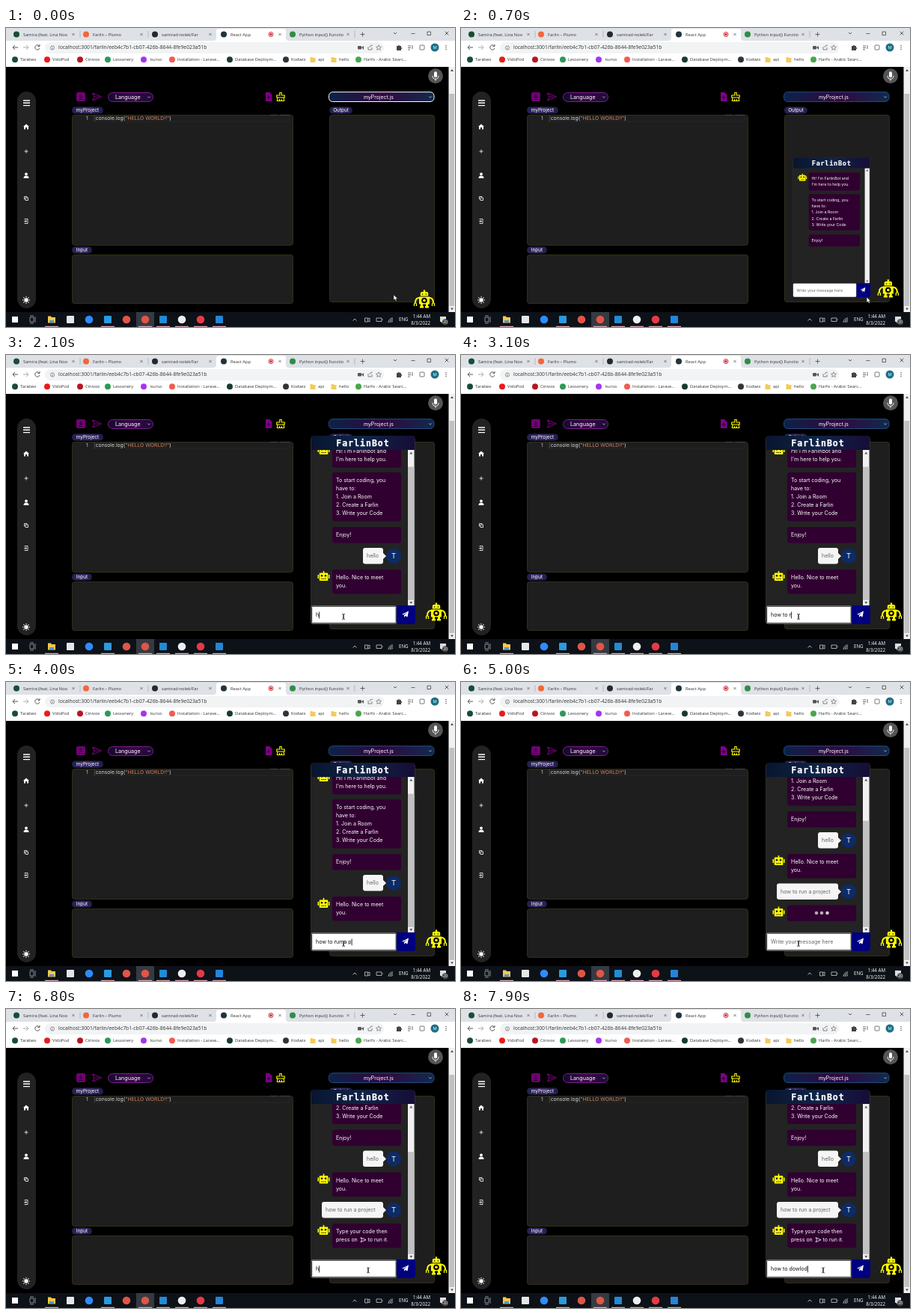
Animation of 600 by 400 pixels, one loop 8000 ms. Source, as an HTML page:

```html
<!DOCTYPE html>
<html lang="en">
<head>
<meta charset="utf-8">
<title>Code room with chat bot</title>
<style>
html, body { margin: 0; width: 100%; height: 100%; overflow: hidden; background: #000; }
svg { display: block; }
text { font: 7.05px Inter, sans-serif; fill: #fff; white-space: pre; }
.ui, .ui text { font: 5.75px "Open Sans", sans-serif; fill: #333; }
.tray text { font: 6.2px "Open Sans", sans-serif; }
.line { fill: none; stroke-width: 1; }
</style>
</head>
<body>
<svg id="stage" width="600" height="400" viewBox="0 0 600 400"></svg>
<script>
const stage = document.getElementById('stage');
const rect = (x, y, w, h, fill, r = 0, more = '') =>
  `<rect x="${x}" y="${y}" width="${w}" height="${h}" fill="${fill}" rx="${r}" ${more}/>`;
const dot = (x, y, r, fill, more = '') => `<circle cx="${x}" cy="${y}" r="${r}" fill="${fill}" ${more}/>`;
const text = (x, y, s, more = '') => `<text x="${x}" y="${y}" ${more}>${s}</text>`;
const path = (d, fill, more = '') => `<path d="${d}" fill="${fill}" ${more}/>`;
const line = (d, color, w = 1) => `<path class="line" d="${d}" stroke="${color}" style="stroke-width:${w}"/>`;
const at = (x, y, body, id = '') => `<g id="${id}" transform="translate(${x} ${y})">${body}</g>`;
const cross = (x, y, r, c = '#555') => line(`M${x - r} ${y - r}l${2 * r} ${2 * r}m0 ${-2 * r}l${-2 * r} ${2 * r}`, c, .7);
const chevron = (x, y, c, r = 2) => line(`M${x - r} ${y - r / 2}l${r} ${r} ${r} ${-r}`, c, .8);
const gradient = (id, ...colors) => `<linearGradient id="${id}">${colors.map((c, i) =>
  `<stop offset="${i / (colors.length - 1)}" stop-color="${c}"/>`).join('')}</linearGradient>`;

const defs = `<defs>
  ${gradient('tagFill', '#20204f', '#3a2c66', '#1d1d4a')}
  ${gradient('langFill', '#14082e', '#3a0849', '#1b0b36')}
  ${gradient('selectFill', '#0b2348', '#310841', '#102a4e')}
  ${gradient('headFill', '#08152f', '#102448', '#160d37')}
  <clipPath id="body"><path d="M408 127h130v208H408z"/></clipPath></defs>`;

function browser() {
  const tabs = [
    [14, 'Samira (feat. Lina Noo', '#174d35', 90], [107, 'Farlin – Plumo', '#f2663b', 181],
    [199, 'samirad-nolek/Far', '#24292f', 273], [291, 'React App', '#20343c', 366],
    [383, 'Python input() Functio', '#2f8d46', 457]];
  const marks = [
    [12, 19, 'Tarabeo', '#174d35'], [55, 62, 'VidoPod', '#e81c1c'], [99, 106, 'Cinivox', '#b71620'],
    [136, 143, 'Lessonery', '#2d9a57'], [184, 193, 'kurso', '#a435f0'],
    [222, 229, 'Installation - Larave...', '#f35b50'], [299, 306, 'Database Deploym...', '#173b30'],
    [374, 381, 'Kodwix', '#30343a'], [410, 417, 'api', '#f4ca58'], [438, 445, 'hello', '#f4ca58'],
    [471, 478, 'Harfo - Arabic Searc...', '#49a64c']];
  return '<g class="ui">' + rect(0, 0, 600, 52, '#fff') + rect(0, 0, 600, 17, '#dee1e6')
    + path('M277 17q4 0 4-4V4q0-3 3-3h87q3 0 3 3v9q0 4 4 4z', '#fff')
    + tabs.map(([x, s, c, end]) => dot(x, 8.5, 4, c) + text(x + 9, 10.5, s) + cross(end, 8.5, 1.6)).join('')
    + line('M99 4v9M190 4v9M466 4v9', '#9a9da1', .6)
    + dot(354, 8.5, 3, 'none', 'stroke="#d42b35"') + dot(354, 8.5, 1.7, '#d42b35')
    + line('M473.500 8.500h6m-3-3v6', '#444', .8)
    + chevron(520, 7, '#333') + line('M541.500 7.500h5M563 5h4.500v4.500h-4.500z', '#333', .7) + cross(589, 7, 2.3, '#222')
    + line('M16 26h-7m3-3-3 3 3 3', '#555') + line('M23 26h7m-3-3 3 3-3 3', '#aaa')
    + line('M44.500 24a3.200 3.200 0 1 0 .5 3M45 22v2.500h-2.500', '#555')
    + rect(52, 19, 453, 15, '#f1f3f4', 7.5) + dot(62, 26.5, 2.6, 'none', 'stroke="#666" stroke-width=".7"')
    + line('M62 26v2m0-3.200v-.7', '#666', .7)
    + text(70, 28.3, 'localhost:3001/farlin/eeb4c7b1-cb07-426b-8644-8fe9e023a51b', 'style="font-size:6.8px"')
    + rect(470, 24, 5, 4.5, '#555', 1) + path('M475 26l3-2v5z', '#555')
    + line('M484 25v4h5v-3m-3 0q0-3 4-3', '#555', .7)
    + path('M498 22.800l1 2.300 2.500.2-1.900 1.600.6 2.400-2.200-1.300-2.200 1.300.6-2.400-1.900-1.600 2.500-.2z', 'none', 'stroke="#555" stroke-width=".6"')
    + path('M522 24h2q1-3 2 0h2v2q3 1 0 2v2h-6z', '#444')
    + line('M537 24h4m-4 2.500h4m-4 2.500h3M543 23v5', '#444', .8) + rect(553, 23, 6, 6, '#fff', 1, 'stroke="#555" stroke-width=".8"')
    + dot(573, 26, 5.5, '#1c7088') + text(573, 28, 'M', 'text-anchor="middle" style="fill:#fff"')
    + [23.5, 26, 28.5].map(y => dot(588, y, .7, '#444')).join('')
    + marks.map(([x, tx, s, c]) => (c == '#f4ca58' ? path(`M${x - 3.5} 39h3l1 1h3v6h-7z`, c) : dot(x, 42.3, 4, c)) + text(tx, 44.2, s)).join('')
    + '</g>';
}

function page() {
  const panel = (x, y, w, h) => rect(x, y, w, h, '#1e1e1e', 3, 'stroke="#38381c" stroke-width=".8"');
  const tag = (x, y, w, s) => rect(x, y, w, 9, 'url(#tagFill)', 4.5)
    + text(x + w / 2, y + 6.8, s, 'text-anchor="middle" style="font-size:6.4px"');
  const rays = [...Array(8)].map((_, i) => `<path class="line" d="M0-5v1.500" stroke="#fff" transform="rotate(${i * 45})"/>`).join('');
  return rect(591.5, 52, 8.5, 328, '#f1f1f1') + rect(592.5, 88, 6.5, 284, '#c1c1c1')
    + path('M596 55l2 3h-4zM596 377.500l2-3h-4z', '#555')
    + dot(574, 64.3, 10, '#555') + rect(572, 58.3, 4, 8, '#fff', 2) + line('M570 63.800q0 4.500 4 4.500t4-4.500m-4 4.500v2.500', '#fff', .9)
    + rect(15, 85, 25, 290, '#222', 12.5)
    + line('M23 97h9m-9 3.300h9m-9 3.300h9', '#fff', 1.4)
    + path('M27 128.500l4 3.500h-1v3.500h-2v-2.500h-2v2.500h-2V132h-1z', '#fff')
    + line('M24.500 165h5m-2.500-2.500v5', '#fff', .8)
    + dot(27, 195.3, 1.9, '#fff') + path('M23.500 201q0-3.500 3.500-3.500t3.500 3.500z', '#fff')
    + line('M26 227h3.500v3.500h-3.500zM25.500 229h-1v-3.500h3.500v1', '#fff', .8)
    + line('M25 256.500v-1h4v6h-4v-1M24 258.500h3.500m-1.500-1.500 1.500 1.500-1.500 1.500', '#fff', .8)
    + at(27, 364, dot(0, 0, 2.7, '#fff') + rays)
    + rect(94, 86, 12, 12, '#730075', 2) + line('M100 88.500v5m-2.200-2 2.200 2 2.200-2m-5 4h5.500', '#20002a')
    + path('M115.500 87l12 5-12 5 2.500-5z', 'none', 'stroke="#730075" stroke-width="1.2" stroke-linejoin="round"') + line('M118 92h6', '#730075')
    + rect(136.500, 86.500, 60, 12, 'url(#langFill)', 6, 'stroke="#87219a" stroke-width=".9"')
    + text(146, 95, 'Language', 'style="font-size:7.2px"') + chevron(191, 92.500, '#ccc', 1.700)
    + path('M347 86h5l3.500 3.500V98h-8.500z', '#81008a') + line('M351 90.500v5m-2.500-2.500h5', '#16001c')
    + line('M365.800 90v-3.500h2.400V90h4v3h-10.400v-3zM363 93l-.7 4.500h9.400l-.7-4.500M365.500 95v2m2.800-2v2', '#ff0', 1.1)
    + rect(431.500, 85.700, 140.500, 12.800, 'url(#selectFill)', 5, 'id="select" stroke-width="1"')
    + text(498, 94.500, 'myProject.js', 'text-anchor="middle" style="font-size:6.9px"') + chevron(567, 92.300, '#ccc', 1.700)
    + tag(88, 105.500, 42, 'myProject') + panel(88.500, 116.500, 295, 174)
    + rect(116.500, 117, 262, 8, 'none', 0, 'stroke="#292929" stroke-width=".7"') + line('M118.500 117v8', '#555', .7)
    + line('M353 116.300h10m3 0h13', '#4a4a68', .7)
    + text(107, 123.200, '1', 'style="font-size:6.7px;fill:#ccc"')
    + text(119.700, 123.200, 'console.log(<tspan fill="#ce8060" style="fill:#ce8060">"HELLO WORLD!!"</tspan>)', 'style="font-size:6.8px;fill:#ddd"')
    + tag(88, 292.500, 27, 'Input') + panel(88.500, 303.500, 295, 65)
    + tag(432, 105.500, 31, 'Output') + panel(432.500, 116.500, 140, 250);
}

function taskbar() {
  const apps = [[86, '#e6e6e6'], [111, '#2d8cff', 1], [136, '#2a9ade'], [161, '#df5547', 1], [186, '#df5547', 1],
    [210, '#218bd3'], [235, '#eee', 1], [260, '#e63946', 1], [285, '#2385d8']];
  return '<g class="tray">' + rect(0, 380, 600, 20, '#0d1118') + rect(174, 380, 24, 20, '#353a42')
    + rect(8, 386, 8, 8, '#fff') + line('M32 387h5v6h-5zM39 386v8M32 385h5m-5 10h5', '#aaa', .8)
    + path('M56 385.500h4l1 1.500h5v7.500h-10z', '#f5c84c') + rect(58, 391, 6, 3, '#4c9bd4')
    + apps.map(([x, c, round]) => round ? dot(x, 390, 5.3, c) : rect(x - 5, 385, 10, 10, c, 1)).join('')
    + [61, 136, 186, 210, 235, 260, 285].map(x => rect(x - 9, 398.800, 18, 1.200, '#dba4b8')).join('')
    + line('M463.500 391.500l2.500-2.500 2.500 2.500', '#ddd', .8)
    + line('M479.500 388h4v5h-4zM484 389l2-1v5l-2-1M495 388h7v4.500h-7zM503 389.500v1.500', '#ccc', .8)
    + line('M511 394a6 6 0 0 1 6-6m-4 6a4 4 0 0 1 4-4m-2 4a2 2 0 0 1 2-2', '#ddd', .8)
    + text(525, 392.300, 'ENG') + text(567, 388.300, '1:44 AM', 'text-anchor="end"') + text(567, 397.300, '8/3/2022', 'text-anchor="end"')
    + path('M580 386h8v7h-4l-2 2v-2h-2z', '#ddd') + dot(587, 393.500, 4, '#444') + text(587, 395.300, '20', 'text-anchor="middle" style="font-size:5px"')
    + '</g>';
}

const botIcon = y => at(424.500, y, path('M-.8-7h1.600v2.500h4q1 0 1 1V5q0 1-1 1h-9.600q-1 0-1-1v-8.500q0-1 1-1h4zM-8-2h1.500v5H-8zM6.500-2H8v5H6.500z', '#ff0')
  + dot(-2.500, -.8, 1.300, '#230023') + dot(2.500, -.8, 1.300, '#230023') + line('M-3 3.500h1.500m.7 0h1.600m.7 0H3', '#230023'));
const bubble = (y, lines, icon) => (icon ? botIcon(y + 9) : '') + rect(436, y, 92, lines.length * 11 + 10.500, '#300030', 3)
  + lines.map((s, i) => text(441, y + 13.300 + i * 11, s)).join('');
const userBubble = (id, x, y, s) => `<g id="${id}">` + rect(x, y, 504 - x, 21.500, '#f5f5f5', 3)
  + path(`M504 ${y + 7}l4 4-4 4z`, '#f5f5f5') + text(x + 5, y + 13.300, s, 'style="fill:#666"')
  + dot(518, y + 11, 10, '#0d2b66') + text(518, y + 14.200, 'T', 'text-anchor="middle" style="font-size:9.5px"') + '</g>';

function chat() {
  const plane = path('M474 379.500l7 3-7 3 1.500-3z', 'none', 'stroke="#fff" stroke-width=".8"');
  const dots = [475, 482, 489.500].map((x, i) => dot(x, 10.500, 2.300, '#fff', `id="dot${i}"`)).join('');
  return '<g id="chat">' + rect(407.500, 108.500, 139, 251, '#232323', 4, 'stroke="#343434" stroke-width=".8"')
    + '<g clip-path="url(#body)"><g id="log">'
    + bubble(135, ["Hi! I'm FarlinBot and", "I'm here to help you."], true)
    + bubble(174, ['To start coding, you', 'have to:', '1. Join a Room', '2. Create a Farlin', '3. Write your Code'])
    + bubble(247, ['Enjoy!'])
    + userBubble('user1', 477, 275, 'hello')
    + `<g id="reply1">${bubble(304, ['Hello. Nice to meet', 'you.'], true)}</g>`
    + userBubble('user2', 422, 343.500, 'how to run a project')
    + `<g id="reply2">${bubble(372.500, ['Type your code then', 'press on'], true)}${at(0, 11.800, plane)}${text(483.500, 396.800, 'to run it.')}</g>`
    + at(0, 0, bubble(0, [''], true) + dots, 'wait') + '</g></g>'
    + rect(537, 127, 8.500, 208, '#f1f1f1') + rect(537, 135, 8.500, 0, '#c1c1c1', 0, 'id="thumb"')
    + path('M541.300 129.500l2 3h-4zM541.300 333l2-3h-4z', '#555')
    + path('M408 127v-15q0-4 4-4h130q4 0 4 4v15z', 'url(#headFill)')
    + text(477, 121.800, 'FarlinBot', 'text-anchor="middle" stroke="#fff" stroke-width=".25" style="font:bold 11.5px DejaVu Sans Mono,monospace;letter-spacing:1px"')
    + rect(407.800, 335.500, 114, 24, '#fff', 2)
    + rect(408.600, 336.200, 112.600, 22.600, 'none', 1, 'id="focus" stroke="#111" stroke-width="1"')
    + text(414, 350.300, '', 'id="field"') + rect(0, 343.500, .8, 9, '#000', 0, 'id="caret"')
    + path('M522 335h25v21q0 4-4 4h-21z', '#000080') + path('M529 347l9-4.500-1.500 8-3-1.500-1.500 2v-3l4-3.500-5 3z', '#fff') + '</g>';
}

const robot = at(0, 0, path('M-1.200-12h2.400v2.500h2q2 0 2 2V-4h-10.400v-3.500q0-2 2-2h2zM-7-3H7V7H-7zM-5 7h3v2.500h1V12h-5V9.500h1zM2 7h3v2.500h1V12H1V9.500h1z', '#ff0')
  + dot(-2.300, -6.500, .8, '#000') + dot(2.300, -6.500, .8, '#000') + dot(0, 2, 3.800, '#000') + dot(0, 2, 1.800, '#ff0')
  + line('M-7-1.500q-4.500 0-5 6m19-6q4.500 0 5 6', '#ff0', 2)
  + line('M-13.500 9.500v-3l1.500-2 1.500 2v3M10.500 9.500v-3l1.500-2 1.500 2v3', '#ff0', 1.300), 'robot');

const pointer = at(0, 0, `<g id="arrow">${path('M0 0v7l1.700-1.500 1.200 2.600 1.300-.6-1.200-2.500h2.300z', '#fff', 'stroke="#000" stroke-width=".4"')}</g>`
  + `<g id="beam">${line('M-1.800-3.500q1.800 0 1.800 1v5q0 1-1.800 1m3.600 0q-1.800 0-1.800-1v-5q0-1 1.800-1', '#000', .8)}</g>`, 'pointer');

stage.innerHTML = defs + browser() + rect(0, 52, 600, 328, '#000') + page() + taskbar() + chat() + robot + pointer;

const $ = id => document.getElementById(id);
const show = (id, on) => { $(id).style.display = on ? '' : 'none'; };
const move = (id, x, y) => $(id).setAttribute('transform', `translate(${x} ${y})`);
const clamp = v => Math.max(0, Math.min(1, v));
const ease = v => { v = clamp(v); return v * v * (3 - 2 * v); };

const OPEN = 500, SEND1 = 1700, REPLY1 = 2000, SEND2 = 4850, REPLY2 = 5600;
const typing = [[1100, 100, 'hello', SEND1], [2100, 140, 'how to run a project', SEND2], [6800, 85, 'how to dowlod', 8000]];
const track = [[0, 518, 357], [400, 559, 362], [600, 559, 362], [1000, 451, 350], [5600, 451, 350],
  [5900, 121, 92], [6100, 121, 58], [6300, 121, 75], [6800, 484, 349.500], [8000, 484, 349.500]];

function mouseAt(t) {
  const i = track.findIndex(p => p[0] > t);
  const [a, x, y] = track[i - 1], [b, x2, y2] = track[i];
  const k = ease((t - a) / (b - a));
  return [x + (x2 - x) * k, y + (y2 - y) * k];
}

function typedAt(t) {
  const run = typing.find(([start, , , end]) => t >= start && t < end);
  return run ? run[2].slice(0, 1 + Math.floor((t - run[0]) / run[1])) : '';
}

function draw(t) {
  const k = ease((t - OPEN) / 300);
  $('chat').setAttribute('transform', `translate(547 360) scale(${k}) translate(-547 -360)`);
  show('chat', k > 0);
  move('robot', 559 + 16 * k, 362.500 - 19 * k);
  $('select').setAttribute('stroke', t < OPEN ? '#fff' : '#254a80');

  const waiting = (t >= SEND1 && t < REPLY1) || (t >= SEND2 && t < REPLY2);
  show('user1', t >= SEND1);
  show('reply1', t >= REPLY1);
  show('user2', t >= SEND2);
  show('reply2', t >= REPLY2);
  show('wait', waiting);
  move('wait', 0, t < REPLY1 ? 304 : 372.500);
  for (let i = 0; i < 3; i++) {
    const phase = ((t - SEND2 - i * 200) / 1400 % 1 + 1) % 1;
    $('dot' + i).setAttribute('opacity', .6 + .4 * Math.abs(1 - 2 * ((phase + .45) % 1)));
  }

  const scroll = t < SEND1 ? 0 : t < REPLY1 ? 6 : t < SEND2 ? 17 : t < REPLY2 ? 74 : 85.500;
  move('log', 0, -scroll);
  const top = 193 * scroll / (208 + scroll);
  $('thumb').setAttribute('y', 135 + top);
  $('thumb').setAttribute('height', scroll ? 193 - top : 0);

  const typed = typedAt(t), field = $('field');
  field.textContent = typed || 'Write your message here';
  field.style.fill = typed ? '#111' : '#666';
  $('caret').setAttribute('x', 414 + (typed ? field.getComputedTextLength() : 0));
  show('caret', typed || (t >= 1000 && !waiting && (t + 460) % 1060 < 530));
  show('focus', t >= 1000);

  const [x, y] = mouseAt(t);
  const overField = t >= 800 && x > 408 && x < 522 && y > 335;
  move('pointer', x, y);
  show('arrow', !overField);
  show('beam', overField);
}

const begin = performance.now();
function tick() {
  draw(Math.floor((performance.now() - begin) % 8000 / 100) * 100);
  requestAnimationFrame(tick);
}
tick();
</script>
</body>
</html>
```
